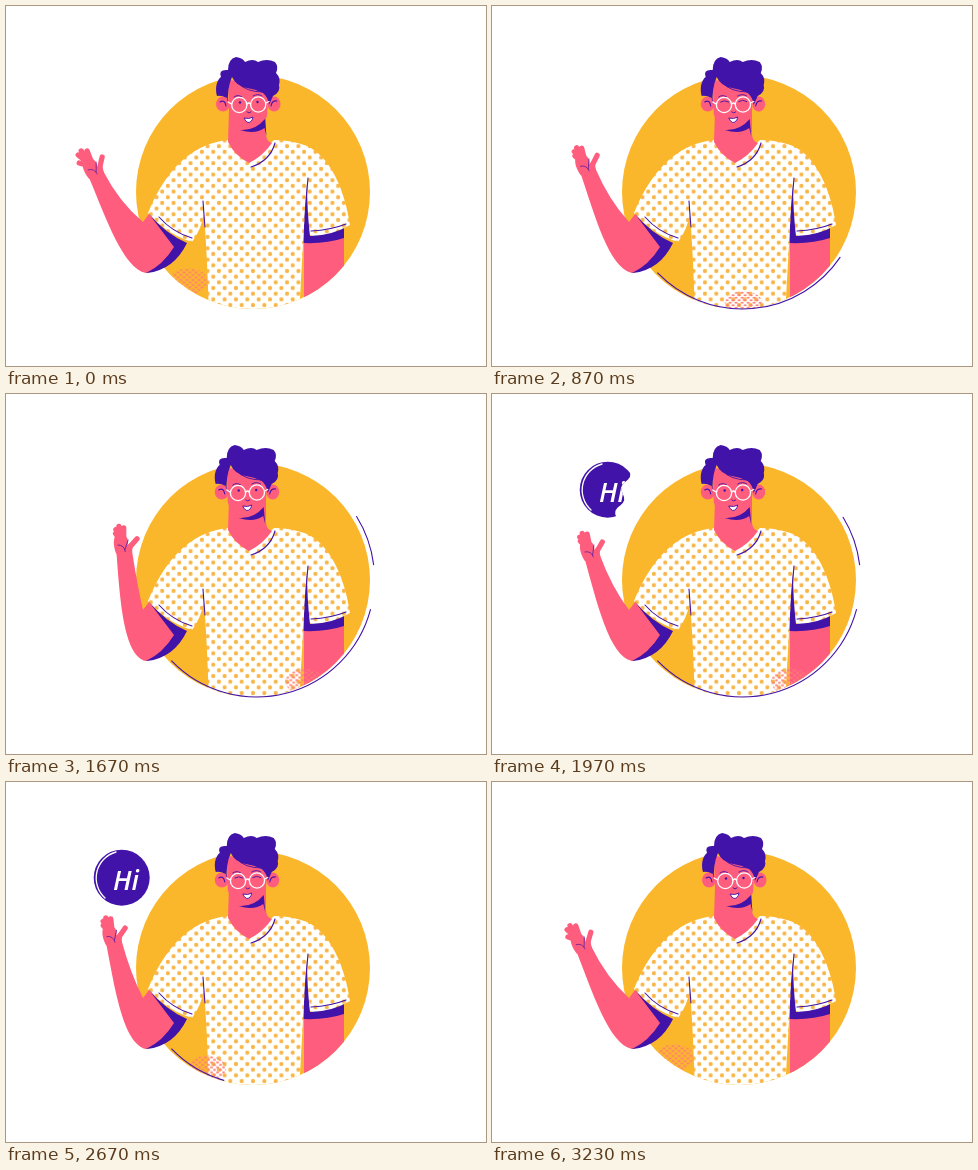
Animation of 480x360 px, one loop 3260 ms. Source, as an HTML page:

```html
<!DOCTYPE html>
<html lang="en">
<head>
<meta charset="utf-8">
<title>Waving man</title>
<style>
  html, body { margin: 0; width: 100%; height: 100%; overflow: hidden; background: #fff; }
  svg { display: block; width: 100vw; height: 100vh; }
  .skin { fill: #ff5d7d; }
  .ink { fill: #4213a8; }
  .sun { fill: #fbb72c; }
  .line { fill: none; stroke: #4213a8; stroke-width: 1.1; stroke-linecap: round; stroke-linejoin: round; }
  .fine { stroke-width: .9; }
  .finger { fill: none; stroke: #ff5d7d; stroke-width: 5.2; stroke-linecap: round; }
  .white { fill: none; stroke: #fff; stroke-width: 1.3; stroke-linecap: round; }
  text { font: italic 600 27px "Open Sans", Lato, sans-serif; fill: #fff; }
</style>
</head>
<body>
<svg viewBox="0 0 480 360">
  <defs>
    <pattern id="dots" x="247" y="265" width="11.35" height="11.35" patternUnits="userSpaceOnUse" viewBox="0 0 12 12">
      <rect width="12" height="12" fill="#fffffd"/>
      <g fill="#f8b649">
        <circle cx="6" cy="6" r="2.2"/>
        <circle cx="0" cy="0" r="2.2"/><circle cx="12" cy="0" r="2.2"/>
        <circle cx="0" cy="12" r="2.2"/><circle cx="12" cy="12" r="2.2"/>
      </g>
    </pattern>
    <pattern id="grain" width="6" height="5" patternUnits="userSpaceOnUse">
      <ellipse cx="1.5" cy="1.2" rx="1.5" ry="1" fill="#ff7d78"/>
      <ellipse cx="4.5" cy="3.7" rx="1.5" ry="1" fill="#ff7d78"/>
    </pattern>
    <clipPath id="disc"><circle cx="247" cy="186" r="117"/></clipPath>
    <clipPath id="wipe"><path id="wipeEdge"/></clipPath>
  </defs>

  <circle class="sun" cx="247" cy="186" r="117"/>

  <g clip-path="url(#disc)">
    <path class="skin" d="M298 234 L338 228 V310 H298Z"/>
    <path class="ink" d="M301 176 Q298 205 297.500 237 Q320 238 338 232 V222 L304 228Z"/>
    <path fill="url(#dots)" d="M222 134 C192 137 163 156 142 207 Q160 228 186 236 Q195 224 198 208 Q201 245 203 310 H293 L298 220 L301 176 Q301 205 304 230 Q325 230 344 219 C338 178 320 144 295 138 Q282 134 268 134 L243 157Z"/>
    <path class="line" d="M197 195 Q198 210 199 221 M302 172 Q300 195 299 212 M305 225 Q325 224 340 218"/>
    <ellipse id="patch" rx="19" ry="13" fill="url(#grain)"/>
  </g>
  <path class="line" d="M153 211 Q166 226 186 232"/>

  <path class="line" id="arc1"/>
  <path class="line" id="arc2"/>

  <path class="ink" d="M143 208 Q160 228 181 237 Q168 264 141 267 L134 264 L164 240Z"/>
  <path class="skin" id="forearm"/>
  <g id="hand">
    <path class="skin" d="M83 173 C74 162 74 151 84 152 Q91 154 91 161 L95 155 L98 168Z"/>
    <path class="finger" id="fingers"/>
    <path class="line" style="stroke-width:.9;opacity:.75" d="M82 164 Q88 162 91 168 M90 166 L90 156"/>
  </g>

  <path class="skin" d="M223 105 L222 136 Q229 150 243 157 Q257 150 266 137 Q260 135 260 128 V105Z"/>
  <path class="line" d="M269 137 Q264 155 245 161"/>

  <g id="head">
    <ellipse class="skin" cx="217" cy="98" rx="7" ry="7.5"/>
    <ellipse class="skin" cx="268" cy="98" rx="6.500" ry="7.5"/>
    <path class="line" d="M214 96 Q219 93 220 100 M271 95 Q266 94 265 100"/>
    <path class="skin" d="M222 74 L223 108 Q228 125 240 126 Q256 126 261 110 L263 78Z"/>
    <path class="ink" d="M234 124 Q249 125 259 113 L260.500 130 L258.500 122 Q249 129 234 124Z"/>
    <path class="ink" d="M222 99 L221 92 Q215 89 211 90 Q209 83 211 77 Q213 72 215 71 Q212 63 222 64 Q222 53 230 51 Q237 52 239 56 Q247 52 252 56 Q261 52 269 56 Q273 61 270 67 Q275 72 273 79 Q275 86 267 90 L263 99 Q262 91 257 87 Q249 83 241 82 Q230 80 226 71 Q221 82 222 99Z"/>
    <path class="line fine" d="M232 77 Q240 86 257 86"/>
    <path class="line fine" d="M228 91 Q232 88 236 91 M247 90 Q252 87 256 90"/>
    <g id="open" class="ink"><circle cx="234" cy="96.5" r="1.2"/><circle cx="251.500" cy="96" r="1.2"/></g>
    <path id="shut" class="line fine" d="M230 96 Q234 93.500 238 96 M248 95.500 Q252 93 256 95.500"/>
    <g class="white"><circle cx="233.3" cy="99" r="7.6"/><circle cx="252.2" cy="98.500" r="7.6"/><path d="M241 98 Q243 96 244.500 98 M225.500 98 L222 96 M260 97 L263 95.500"/></g>
    <path class="line fine" d="M241 106 Q243 108 245 106"/>
    <path fill="#fff" stroke="#4213a8" stroke-width=".9" d="M238 112 Q243 113.500 247 111 Q246 116.500 242 116.500 Q239.500 115.500 238 112Z"/>
  </g>

  <g id="bubble" clip-path="url(#wipe)">
    <circle class="ink" cx="115.700" cy="95.700" r="28"/>
    <path class="white" d="M110 70 A27 27 0 0 0 99 116"/>
    <text x="120" y="108" text-anchor="middle">Hi</text>
  </g>
</svg>
<script>
const LOOP = 3260, WAVES = 7, RAD = Math.PI / 180;
const ELBOW = [137, 250], RING = [250.5, 185, 118];
// Each finger: root, spread tip, gathered tip.
const FINGERS = [
  [84, 160, 73, 157, 76, 154],
  [83, 158, 72, 149, 75, 150],
  [84, 157, 75, 145, 77, 146],
  [86, 158, 81, 145, 82, 146],
  [93, 164, 96, 151, 98, 152]
];
const $ = id => document.getElementById(id);
const mix = (a, b, k) => a + (b - a) * k;

const smooth = (t, a, b) => {
  const u = Math.min(1, Math.max(0, (t - a) / (b - a)));
  return u * u * (3 - 2 * u);
};
const there = (t, a, b, c, d) => smooth(t, a, b) * (1 - smooth(t, c, d));

function turn(x, y, deg) {
  const c = Math.cos(deg * RAD), s = Math.sin(deg * RAD);
  const dx = x - ELBOW[0], dy = y - ELBOW[1];
  return [ELBOW[0] + dx * c - dy * s, ELBOW[1] + dx * s + dy * c];
}

// Angles run counter-clockwise on screen from the bottom of the ring.
function ringPoint(deg, r = RING[2]) {
  return [RING[0] + r * Math.sin(deg * RAD), RING[1] + r * Math.cos(deg * RAD)];
}

function drawArc(id, from, to) {
  $(id).setAttribute("d", to - from < 0.5 ? "" :
    `M${ringPoint(from)} A${RING[2]} ${RING[2]} 0 0 0 ${ringPoint(to)}`);
}

function drawArm(t) {
  const deg = 9.6 * (1 - Math.cos(2 * Math.PI * (t * WAVES / LOOP - 0.025)));
  const p = (x, y) => turn(x, y, deg);
  $("forearm").setAttribute("d",
    `M${p(83, 172)} C${p(100, 212)} 117 262 140 267 Q157 259 168 241 L143 208 L137 216 Q${p(113, 196)} ${p(97, 165)}Z`);
  $("hand").setAttribute("transform", `rotate(${deg} ${ELBOW})`);
  const k = smooth(deg, 0, 5);
  $("fingers").setAttribute("d", FINGERS.map(([x, y, ax, ay, bx, by]) =>
    `M${x} ${y} L${mix(ax, bx, k)} ${mix(ay, by, k)}`).join(" "));
}

function drawWipe(t) {
  const k = there(t, 1780, 2070, 2850, 3060);
  $("bubble").style.display = k > 0.001 ? "" : "none";
  const edge = -33 + 66 * k;
  let d = "M-45 -45";
  for (let y = -45; y <= 45; y += 3) d += ` L${edge + 3 * Math.sin(y / 4)} ${y}`;
  $("wipeEdge").setAttribute("d", d + " L-45 45Z");
  $("wipeEdge").setAttribute("transform", "translate(116 96) rotate(14)");
}

function draw(t) {
  drawArm(t);

  const run = there(t, 300, 1300, 1940, 2940);
  const tip = -46 + 168 * run;
  drawArc("arc1", -46, Math.min(tip, 75));
  drawArc("arc2", 97, tip);
  const [x, y] = ringPoint(-37 + 62 * run, 113);
  $("patch").setAttribute("transform", `translate(${x} ${y})`);

  const sway = there(t, 100, 700, 2600, 3200);
  $("head").setAttribute("transform", `translate(${-1.3 * sway} 0)`);
  const shut = (t > 420 && t < 1600) || (t > 2580 && t < 2780);
  $("open").style.display = shut ? "none" : "";
  $("shut").style.display = shut ? "" : "none";

  drawWipe(t);
}

const start = performance.now();
function tick() {
  draw((performance.now() - start) % LOOP);
  requestAnimationFrame(tick);
}
tick();
</script>
</body>
</html>
```
